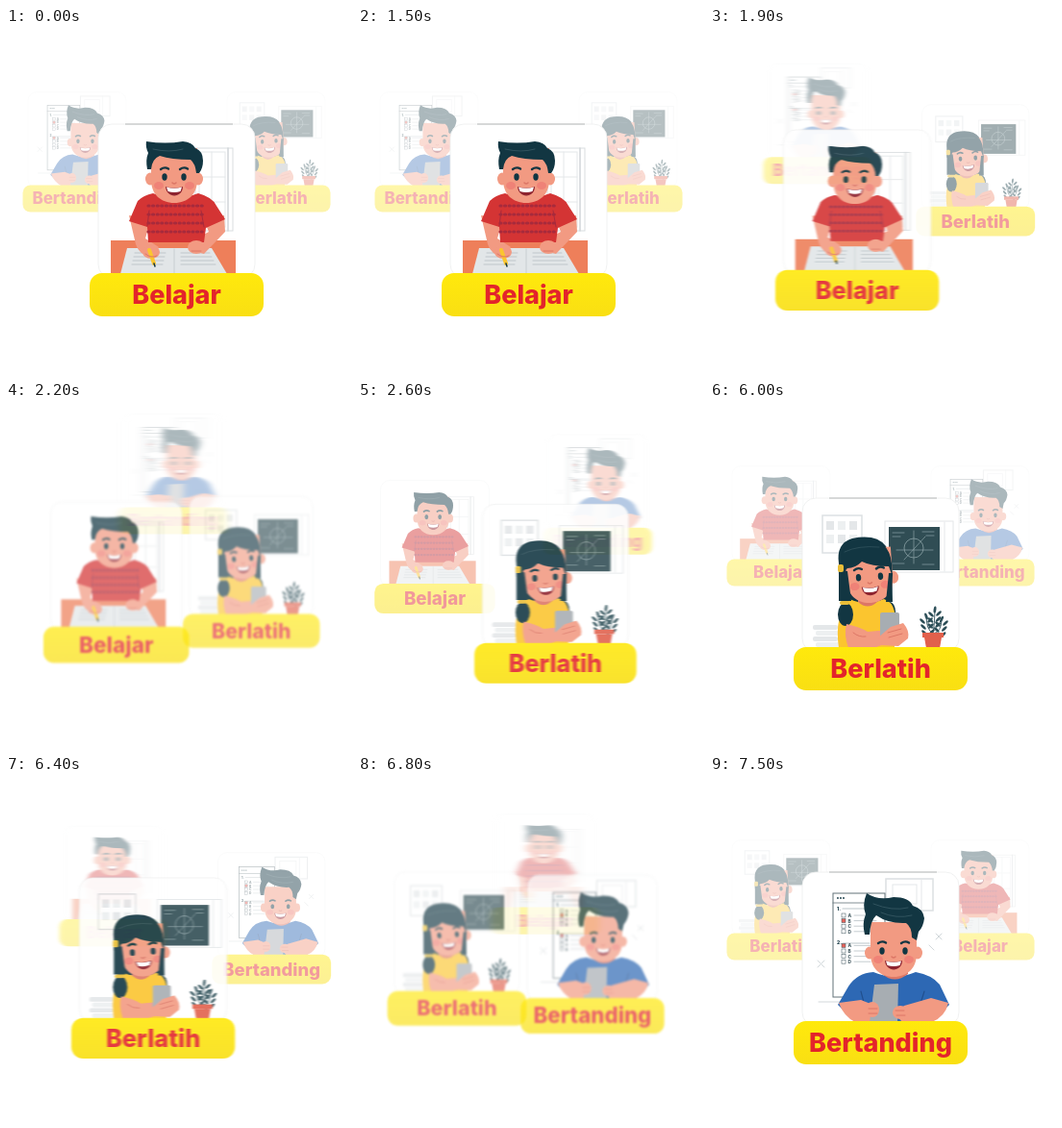
Animation of 360x360 px, one loop 8000 ms. Source, as an HTML page:

```html
<!DOCTYPE html>
<html lang="id">
<head>
<meta charset="utf-8">
<style>
html, body { margin: 0; width: 100%; height: 100%; overflow: hidden; background: #fff; }
svg { display: block; width: 100%; height: 100%; }
text { font-family: Inter, sans-serif; font-weight: 800; }
</style>
</head>
<body>
<svg id="stage" viewBox="0 0 360 360"></svg>
<script>
const HAIR = '#123642', SKIN = '#f29a82', SHADE = '#dc7766', GREY = '#e4e7e9', YELLOW = '#fbc52f';

const fill = (d, color) => `<path d="${d}" fill="${color}"/>`;
const line = (d, color, width = 1, extra = '') =>
  `<path d="${d}" fill="none" stroke="${color}" stroke-width="${width}" stroke-linecap="round" stroke-linejoin="round" ${extra}/>`;
const box = (x, y, w, h, color, r = 0, extra = '') =>
  `<rect x="${x}" y="${y}" width="${w}" height="${h}" rx="${r}" fill="${color}" ${extra}/>`;
const oval = (x, y, rx, ry, color) => `<ellipse cx="${x}" cy="${y}" rx="${rx}" ry="${ry}" fill="${color}"/>`;
const frame = (x, y, w, h, color = GREY, width = 1) =>
  box(x, y, w, h, '#fff', 0, `stroke="${color}" stroke-width="${width}"`);
const repeat = (n, draw) => Array.from({ length: n }, (_, i) => draw(i)).join('');

// Head with its centre between the eyes
function face(x, y, spread = 10, tilt = 0) {
  const eye = dx => oval(x + dx, y, 2.7, 3.7, HAIR) +
    line(`M${x + dx - 4} ${y - 8}q4 -3 8 -.5`, HAIR, 2.4);
  return `<g transform="rotate(${tilt} ${x} ${y})">` +
    oval(x - 25, y + 2, 5, 6.5, SKIN) + oval(x + 25, y + 2, 5, 6.5, SKIN) +
    fill(`M${x - 24} ${y - 30}h48v33c0 15-10 24-24 24s-24-9-24-24z`, SKIN) +
    oval(x - 16, y + 9, 5, 4, '#ef8277') + oval(x + 16, y + 9, 5, 4, '#ef8277') +
    eye(-spread) + eye(spread) + line(`M${x - 2} ${y + 6}q2 2 4 0`, SHADE, 1.6) +
    fill(`M${x - 9} ${y + 10}q9 3 18 0c0 12-17 13-18 0z`, '#8e2430') +
    fill(`M${x - 8} ${y + 10.5}q8 2.5 16 0l-1.5 4.500q-6.500 2-13 0z`, '#fff') + '</g>';
}

function studying() {
  const stripe = y => line(`M148 ${y}h58`, '#a72a3c', 3.2, 'stroke-dasharray="1 3.6"');
  return frame(197, 125, 39, 86, '#d9dddf') + frame(201, 129, 27, 78) +
    line('M214 129v78M201 155h27M201 181h27', GREY) + line('M231 125v86', '#d0d5d8', 1.5) +
    box(109, 221, 130, 36, '#ee7f5a') +
    fill('M126 229h88l16 27H119z', '#e2e6e8') +
    repeat(4, i => line(`M${134 - i} ${234 + i * 4}h32M182 ${234 + i * 4}h${30 + i * 2}`, '#b5bec3', .8)) +
    line('M175 230v25', '#c8ced1') +
    fill('M128 195l7 30q4 12 16 13l8-10-14-9 6-21zM227 195l1 17-22 23-15-4 2-9 18-10-7-17z', SKIN) +
    fill('M153 172q23 9 47 0 15 4 19 13l9 14-20 9-2 15h-58l-1-16-19-6 9-21q6-6 16-8z', '#d43434') +
    repeat(4, i => stripe(185 + i * 9)) +
    line('M147 206l2-16M206 207l-3-17', '#a72a3c', 1) +
    fill('M163 170h26v5q-13 9-26 0z', SHADE) +
    face(175, 155) +
    fill('M146 118q20 3 38 0 10 1 13 7 8 3 8 13 0 8-4 13h-3q-1-10-6-14-20 0-32-4-8 3-9 14h-4q-2-10 1-17-3-6-2-12z', HAIR) +
    line('M153 126q17 4 31 0', '#31535e', 1) +
    oval(151, 233, 9, 7, SKIN) + oval(198, 228, 9, 7, SKIN) +
    line('M149 231l5 14', YELLOW, 4) + line('M154 245l1 3', HAIR, 1.5) +
    line('M145 235q6 5 12 2M193 232h10', SHADE, 1);
}

function practising() {
  const leaf = (x, y, a) => `<ellipse rx="3.600" ry="1.400" fill="#2d4f58" transform="translate(${x} ${y}) rotate(${a})"/>`;
  const sprig = (x, y, lean) => line(`M232 241Q${x} ${y + 14} ${x} ${y}`, '#2d4f58', .9) + leaf(x, y, 90 + lean) +
    repeat(3, i => leaf(x - 4 - lean * i / 20, y + 5 + i * 6, 45) + leaf(x + 4 - lean * i / 20, y + 4 + i * 6, -45));
  const tie = (x, y) => box(x - 5, y, 10, 4, '#e8bd38', 2);
  return frame(117, 118, 41, 39, '#dde1e3', 1.5) +
    repeat(6, i => box(121 + i % 3 * 12, 124 + (i > 2) * 14, 8, 9, i % 2 ? '#edf0f1' : GREY)) +
    frame(182, 124, 71, 53, '#e3e6e8', 1) + line('M244 125v51', GREY) +
    box(186, 130, 53, 45, '#304d54') +
    line('M212 134v34M194 154h38M190 136h12M190 140h8M221 135h12M225 139h8M190 168h12M221 169h12M202 164l22-24', '#8ca2a6', .7) +
    `<circle cx="212" cy="152" r="10" fill="none" stroke="#8ca2a6" stroke-width=".8"/>` +
    repeat(4, i => box(107 + i % 2 * 3, 232 + i * 6, 26, 5, i % 2 ? '#edf0f1' : GREY, 2)) +
    sprig(225, 223, -20) + sprig(234, 216, 8) + sprig(241, 226, 24) +
    box(221, 240, 22, 5, '#e1604c') + fill('M223 245h18l-2 11h-14z', '#e1604c') +
    fill('M134 168q-3-21 14-26 25-5 35 8 6 8 6 28l1 30h-52z', HAIR) +
    oval(187, 218, 6, 10, HAIR) +
    fill('M145 205q18 8 36 0 9 3 11 13v38h-58q-5-34 11-51z', YELLOW) +
    fill('M154 201h20v7q-10 9-20 0z', SHADE) +
    face(166, 182, 11.5, -4) +
    fill('M134 181q-2-33 19-39 33-3 36 26l1 14-4-11q-18 0-28-5-7 7-15 7z', HAIR) +
    line('M140 156q14-7 36-5', '#31535e', .8) +
    fill('M134 176h9l4 31h-13zM186 178h4l-1 30h-6z', HAIR) +
    box(133, 169, 6, 8, '#e8bd38', 2) +
    oval(141, 221, 8, 12, HAIR) + tie(140, 207) +
    fill('M142 231q14 3 22 8l22-2 4 12-20 7h-26q-5-14-2-25z', SKIN) +
    box(177, 219, 20, 33, '#a7adb2', 2) +
    fill('M188 234l13-4q7 8 5 16l-10 8-19-1-2-8z', SKIN) +
    line('M185 240l14-4M186 245l14-4M149 240q6 5 13 4', SHADE, 1);
}

function competing() {
  const option = i => {
    const y = 143 + i * 5.600 + (i > 3) * 9;
    return box(137, y, 4, 4, i == 1 || i == 4 ? '#e46058' : '#fff', 0, 'stroke="#566970" stroke-width=".6"') +
      `<text x="143.500" y="${y + 4}" font-size="4.800" fill="#445a62">${'ABCD'[i % 4]}</text>` +
      line(`M150 ${y + 2}h${16 + i * 7 % 12}`, '#c5ccd0', 1);
  };
  return frame(183, 107, 49, 33, '#dce0e2', 1.5) + frame(190, 113, 25, 20) + line('M220 107v33', GREY) +
    line('M113 235h25M112 192l7 7M119 192l-7 7M235 164l6 6M241 164l-6 6M228 176l5 5', '#d2d8db') +
    frame(128, 122, 54, 108, '#627279', 1) + line('M128 132h54', '#627279', .8) +
    repeat(3, i => oval(133 + i * 3, 127, .9, .9, HAIR)) +
    line('M138 138h35M138 174h28', '#bcc5c9', 1.2) +
    `<text x="132" y="140" font-size="5" fill="${HAIR}">1.</text><text x="132" y="175" font-size="5" fill="${HAIR}">2.</text>` +
    repeat(8, option) +
    fill('M170 204q22 9 44 0 17 3 25 13l10 21-18 18h-80l-18-18 11-19q9-14 26-15z', '#2d68b4') +
    line('M157 224l5 19M223 224l-5 16', '#21508f', 1.2) +
    fill('M179 200h27v6q-14 11-27 0z', SHADE) +
    face(191, 182, 12) +
    fill('M163 122q12 8 28 4 16 0 20 9 11 3 12 13-1 9-6 14l-2 9-5-3q0-11-6-15-18 1-31-8-6 5-7 20h-5q-3-12 1-21-4-10 1-22z', HAIR) +
    line('M170 133q20 8 36 4M178 142q16 7 32 3', '#31535e', 1) +
    fill('M134 236l23-3 15 6 4 17h-25q-12-6-17-20zM248 236l-18-5-28 8-9 9 7 8h31q14-6 17-20z', SKIN) +
    fill('M171 217l25-1-1 41h-29z', '#a7adb2') +
    oval(169, 243, 7, 8, SKIN) + oval(198, 246, 8, 7, SKIN) +
    line('M165 242h9M165 247h9M193 244h9M194 249h9', SHADE, 1);
}

const card = (name, picture) => `<g class="card">
  ${box(96, 100, 163, 160, '#fff', 14, 'stroke="#eceeee" stroke-width=".8"')}
  <g clip-path="url(#window)">${picture()}</g>
  <path class="edge" d="M124 100H236" stroke="#a4a7a8" stroke-width=".8"/>
  ${box(87, 255, 181, 45, 'url(#gold)', 13)}
  <text x="177.500" y="287" font-size="27" text-anchor="middle" fill="#e3242b">${name}</text></g>`;

const stage = document.getElementById('stage');
stage.innerHTML = `<defs>
  <clipPath id="window"><rect x="96" y="100" width="163" height="160" rx="14"/></clipPath>
  <linearGradient id="gold" x2="0" y2="1"><stop stop-color="#ffe90c"/><stop offset="1" stop-color="#f9df13"/></linearGradient>
  ${repeat(3, i => `<filter id="blur${i}" color-interpolation-filters="sRGB"><feGaussianBlur/></filter>`)}</defs>` +
  card('Belajar', studying) + card('Berlatih', practising) + card('Bertanding', competing);

const cards = [...stage.querySelectorAll('.card')];
const blurs = stage.querySelectorAll('feGaussianBlur');
const FRONT = { x: 177.5, y: 277.5 }, SIDE_Y = 177.5, REACH = 103.5, SMALL = .625, FADED = .35;
const mix = (a, b, k) => a + (b - a) * k;

// role 0: front to left, 1: right to front, 2: left to right behind the others
function pose(role, e, rise) {
  const hump = 4 * e * (1 - e);
  if (role == 2) return {
    x: mix(FRONT.x - REACH, FRONT.x + REACH, e) + 10 * hump, y: SIDE_Y - rise * hump,
    near: 0, alpha: FADED, blur: [6 * hump, 1.2 * hump]
  };
  const near = role ? e : 1 - e, a = near * Math.PI / 2;
  // slightly flattened quarter ellipse
  const out = mix(Math.cos(a), 1 - near, .12), down = mix(Math.sin(a), near, .12);
  return {
    x: FRONT.x + REACH * out * (role ? 1 : -1), y: mix(SIDE_Y, FRONT.y, down),
    near, alpha: mix(FADED, 1, near), blur: [1.6 * hump, 1.1 * hump]
  };
}

function draw(now) {
  const t = Math.floor(now % 8000 / 100) * 100;
  const turn = t < 6000 ? 0 : 1;
  const p = Math.min(1, Math.max(0, (t - (turn ? 6030 : 1530)) / 1470));
  const e = p * p * (3 - 2 * p);
  const moving = e > 0 && e < 1;
  const poses = cards.map((el, i) => {
    const role = (i - turn + 3) % 3;
    const q = pose(role, e, turn ? 27 : 55), s = mix(SMALL, 1, q.near);
    el.setAttribute('transform', `translate(${q.x} ${q.y}) scale(${s}) translate(${-FRONT.x} ${-FRONT.y})`);
    el.setAttribute('opacity', q.alpha);
    el.setAttribute('filter', moving ? `url(#blur${i})` : 'none');
    blurs[i].setAttribute('stdDeviation', q.blur.join(' '));
    el.querySelector('.edge').setAttribute('opacity', q.near == 1 ? 1 : 0);
    return { el, near: q.near, behind: role == 2 };
  });
  poses.sort((a, b) => b.behind - a.behind || a.near - b.near).forEach(q => stage.append(q.el));
  requestAnimationFrame(draw);
}
requestAnimationFrame(draw);
</script>
</body>
</html>
```
